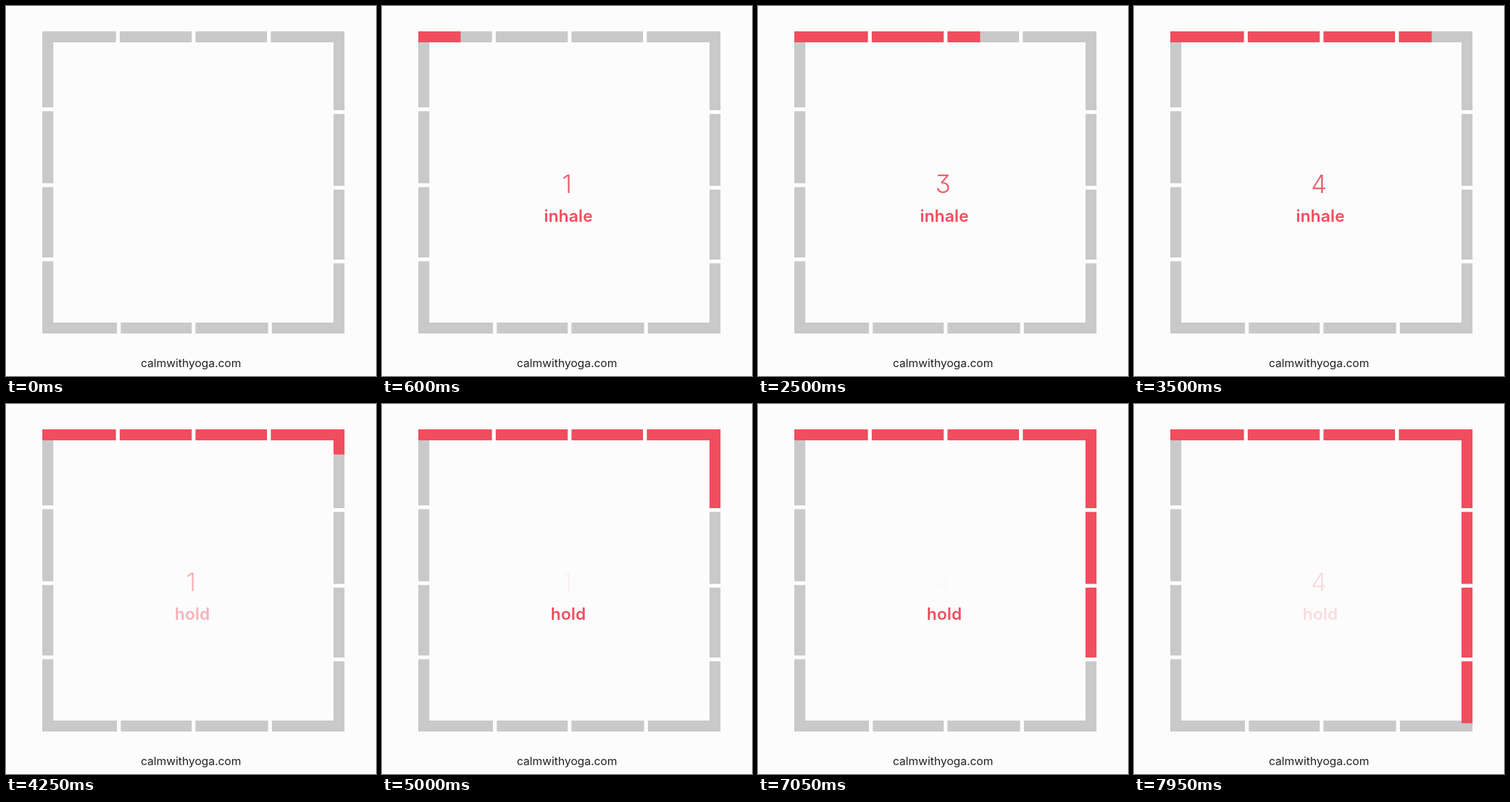
An HTML page for the animation above (8000 ms loop, 540 px wide and 540 px high).

```html
<!DOCTYPE html>
<html lang="en">
<head>
<meta charset="utf-8">
<title>Box breathing</title>
<style>
  html, body { margin: 0; width: 100%; height: 100%; overflow: hidden; background: #fcfcfc; }
  svg { display: block; width: 100vw; height: 100vh; }
  text { font-family: Inter, Lato, sans-serif; text-anchor: middle; }
  .base { fill: #c9c9c9; }
  .fill, .count, .word { fill: #ef4e5e; }
  .count { font-size: 37px; font-weight: 300; font-feature-settings: "cv09"; }
  .word { font-size: 24px; font-weight: 600; letter-spacing: .2px; }
  .site { fill: #222; font-size: 16.5px; }
</style>
</head>
<body>
<svg viewBox="0 0 540 540">
  <rect width="540" height="540" fill="#fcfcfc"/>
  <path class="base" fill-rule="evenodd" d="M53 37H494V478H53ZM69 53V462H478V53Z"/>
  <rect class="fill" id="top" x="53" y="37" height="16"/>
  <rect class="fill" id="right" x="478" y="53" width="16"/>
  <g id="gaps" fill="#fefefe"></g>
  <text class="count" id="count" x="270" y="272.5"></text>
  <text class="word" id="word" x="272" y="315"></text>
  <text class="site" x="270" y="527">calmwithyoga.com</text>
</svg>
<script>
const LOOP = 8000, STEP = 50, LEAD = 40, BEAT = 1000, PHASE = 4 * BEAT, FADE = 500;
const $ = id => document.getElementById(id);
const clamp = (v, lo, hi) => Math.min(hi, Math.max(lo, v));

const gap = (x, y, w, h) =>
  `<rect x="${x}" y="${y}" width="${w}" height="${h}"/>`;
$('gaps').innerHTML = [
  ...[160.5, 271, 381].map(x => gap(x, 36, 5.5, 17)),
  ...[162, 271, 382.5].map(x => gap(x, 462, 5.5, 17)),
  ...[148, 258.7, 367].map(y => gap(52, y, 17, 5.5)),
  ...[152, 262.5, 370].map(y => gap(478, y, 17, 5.5))
].join('');

// Rises over FADE, holds, then falls over FADE at the end of the span.
const fade = (t, span) => clamp(Math.min(t, span - t) / FADE, 0, 1);

function label(el, text, opacity) {
  if (el.textContent !== text) el.textContent = text;
  el.setAttribute('opacity', opacity);
}

function draw(ms) {
  const t = Math.floor(ms / STEP) * STEP;
  const run = t < 2 * STEP ? 0 : t - LEAD;
  const phase = run % PHASE;
  $('top').setAttribute('width', clamp(run * 441 / PHASE, 0, 441));
  $('right').setAttribute('height', clamp((run - PHASE - 15) * 0.106, 0, 425));
  label($('count'), String(Math.floor(phase / BEAT) + 1), fade(phase % BEAT, BEAT));
  label($('word'), run < PHASE ? 'inhale' : 'hold', fade(phase, PHASE));
}

const start = performance.now();
function tick() {
  draw((performance.now() - start) % LOOP);
  requestAnimationFrame(tick);
}
draw(0);
requestAnimationFrame(tick);
</script>
</body>
</html>
```
